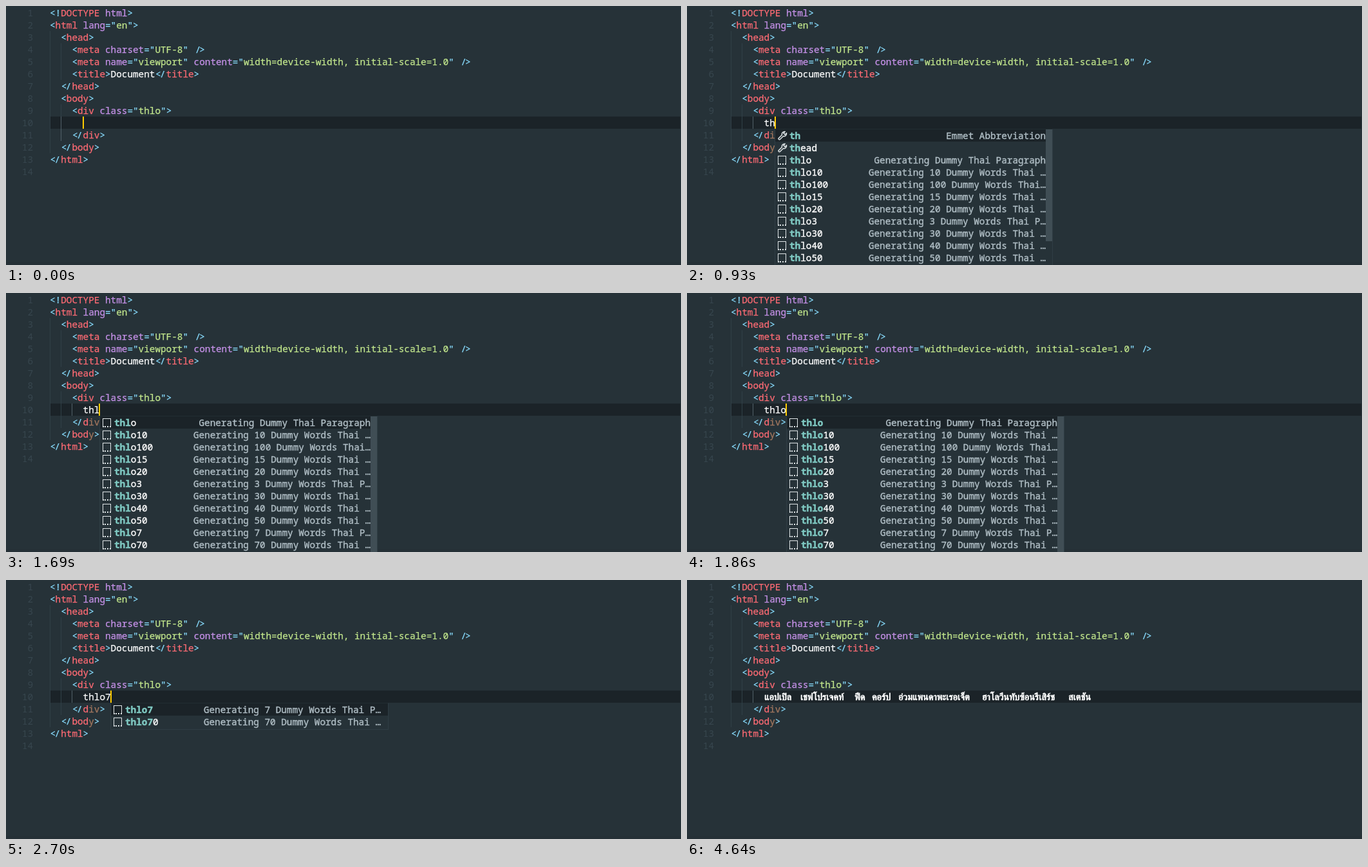
Write an HTML page that moves like this. It is 1048 px wide and 403 px high and loops after 5120 ms.

```html
<!DOCTYPE html>
<html lang="en">
<head>
<meta charset="utf-8">
<title>Snippet completion</title>
<style>
html, body { margin: 0; width: 100%; height: 100%; overflow: hidden; background: #263238; }
#stage { position: relative; width: 1048px; height: 403px; overflow: hidden; color: #fff;
  font: 14.333px/19px "Noto Sans Mono", "DejaVu Sans Mono", monospace; font-variant-ligatures: none;
  -webkit-text-stroke: .25px; }
#stage div, #stage svg { position: absolute; white-space: pre; }
b { font-weight: 400; }
i { font-style: normal; position: relative; }
u { text-decoration: none; }
.dim u { color: #a5785f; }
.p { color: #89ddff; } .t { color: #ff6b74; } .a { color: #c792ea; } .s { color: #c3e88d; }
.num { width: 42px; text-align: right; color: #37464e; -webkit-text-stroke: 0; }
.guide { width: 1px; background: #304047; }
.guide.on { background: #506068; }
#line { left: 68px; top: 172px; width: 979px; height: 19px; background: #1b2328; }
#foot { top: 398px; width: 1048px; height: 5px; background: #253036; }
#caret { top: 172px; width: 2px; height: 19px; background: #fc0; }
#thai { font-weight: 600; }
#popup { top: 191px; width: 430px; overflow: hidden;
  background: #263238; border: 1px solid #2f3d44; border-top-color: #222d32; }
.row { left: 0; width: 430px; height: 19px; font-weight: 500; -webkit-text-stroke: .4px; }
.row.on { background: #1b2328; }
.row b { font-weight: 700; color: #80cbc4; }
.label { left: 22px; }
.detail { color: #b0bec5; }
.icon { left: 4px; top: 3px; width: 11px; height: 11px; border: 1px solid #dfe5e7; border-bottom: 2px dotted #dfe5e7; }
.thumb { left: 420px; width: 11px; background: #404e55; }
</style>
</head>
<body>
<div id="stage"></div>
<script>
const CHAR = 8.6, ROW = 19, LOOP = 5120;
const stage = document.getElementById('stage');
const code = `<!DOCTYPE html>
<html lang="en">
  <head>
    <meta charset="UTF-8" />
    <meta name="viewport" content="width=device-width, initial-scale=1.0" />
    <title>Document</title>
  </head>
  <body>
    <div class="thlo">

    </div>
  </body>
</html>
`.split('\n');

const span = (cls, s) => `<b class=${cls}>${s}</b>`;
const nudge = (s, dx) => `<i style="left:${dx}px">${s}</i>`;

function paintTag(tag) {
  let named = false;
  return tag.replace(/<[!/]?|\/?>|=|"[^"]*"|[\w-]+/g, s => {
    if (s[0] == '"') return span('p', '"') + span('s', s.slice(1, -1)) + span('p', '"');
    if (/^\w/.test(s)) {
      const cls = named ? 'a' : 't';
      named = true;
      return span(cls, s);
    }
    // Tight bracket pairs, as in a coding font
    if (s == '</') return span('p', nudge('&lt;', .5) + nudge('/', -1));
    if (s == '/>') return span('p', nudge('/', 2) + '&gt;');
    return span('p', s.replace('<', '&lt;').replace('>', '&gt;'));
  });
}

function add(html, style = '', cls = '', id = '') {
  const el = document.createElement('div');
  el.innerHTML = html;
  el.style.cssText = style;
  el.className = cls;
  el.id = id;
  stage.append(el);
  return el;
}

const lineTop = n => 1 + ROW * (n - 1);
const guide = (x, from, to) =>
  add('', `left:${x}px;top:${lineTop(from)}px;height:${(to - from + 1) * ROW}px`, 'guide');

add('', '', '', 'foot');
add('', '', '', 'line');
guide(68, 3, 12);
guide(85, 4, 6);
guide(85, 9, 9);
const outer = guide(85, 10, 11), inner = guide(102, 10, 10);
inner.classList.add('on');
code.forEach((text, i) => {
  let html = text.replace(/<[^>]+>/g, paintTag);
  if (i == 10 || i == 11) html = html.replace(/(iv|y)(?=<\/b>)/, '<u>$1</u>');
  add(i + 1, `top:${lineTop(i + 1)}px`, 'num');
  add(html, `left:68px;top:${lineTop(i + 1)}px`);
});
const typed = add('', 'left:0;top:172px');
const popup = add('', '', '', 'popup');
const caret = add('', '', '', 'caret');

// Completion lists: [label, detail, has wrench icon]
const lorem = n => ['thlo' + n, n ? `Generating ${n} Dummy Words Thai Paragraph` : 'Generating Dummy Thai Paragraph'];
const svelte = s => ['s-' + s, 'svelte-' + s];
const all = ['', 10, 100, 15, 20, 3, 30, 40, 50, 7, 70].map(lorem);
const lists = {
  t: { rows: [...[30, 40, 50, 7, 70].map(lorem), ...['then-block', 'transition', 'transition-all',
      'transition-events', 'transition-local', 'transition-params', 'await-then-block'].map(svelte)],
    pick: 3, shift: -17, thumb: [141, 71] },
  th: { rows: [['th', 'Emmet Abbreviation', 1], ['thead', '', 1], ...all.slice(0, 9)], thumb: [0, 174] },
  thl: { rows: all, thumb: [0, 212] },
  thlo: { rows: all, thumb: [0, 212] },
  thlo7: { rows: all.slice(9) }
};
const wrench = `<svg style="left:4px;top:2px" width="15" height="15" fill="none" stroke="#dfe5e7" stroke-width="1.5">
<path d="M11 1.5A4 4 0 0 0 6.5 6.5L1.5 11.5A1.4 1.4 0 0 0 3.5 13.5L8.5 8.5A4 4 0 0 0 13.5 4L11 6L9 4Z"/></svg>`;
const clip = s => s.length > 32 ? s.slice(0, 31) + '…' : s;

function listHtml(query) {
  const { rows, pick = 0, shift = 0, thumb } = lists[query];
  const match = new RegExp(`(^|-)(${query})`);
  return (thumb ? `<div class="thumb" style="top:${thumb[0]}px;height:${thumb[1]}px"></div>` : '') +
    rows.map(([label, detail, tool], i) =>
      `<div class="row${i == pick ? ' on' : ''}" style="top:${shift + i * ROW}px;${thumb ? 'width:420px' : ''}">` +
      (tool ? wrench : '<div class="icon"></div>') +
      `<div class="label">${label.replace(match, '$1<b>$2</b>')}</div>` +
      `<div class="detail" style="right:${thumb ? 0 : 11}px">${clip(detail)}</div></div>`).join('');
}

const thai = [[120, 'แอปเปิล'], [176, 'เชฟโปรเจคท์'], [260, 'ฟีด'], [287, 'คอร์ป'],
  [328, 'อ่วมแพนดาพะเรอเจ็ต'], [458, 'ฮาโลวีนทับซ้อนรีเสิร์ช'], [592, 'สเตชัน']];
const thaiHtml = `<div id="thai">${thai.map(([x, w]) => `<div style="left:${x}px">${w}</div>`).join('')}</div>`;

const keys = [[0, ''], [600, 't'], [930, 'th'], [1690, 'thl'], [1860, 'thlo'], [2700, 'thlo7'], [3180, null]];
const hidden = [[300, 600], [1390, 1690], [2320, 2700], [3710, 4190], [4640, LOOP]];
let shown;

function render(t) {
  const text = keys.filter(k => k[0] <= t).pop()[1];
  const x = text === null ? 631 : 68 + CHAR * (6 + text.length);
  if (text !== shown) {
    shown = text;
    typed.innerHTML = text === null ? thaiHtml : `<div style="left:119.6px">${text}</div>`;
    popup.innerHTML = text ? listHtml(text) : '';
    popup.style.left = Math.floor(x) + 'px';
    popup.style.height = (text == 'thlo7' ? 40 : 212) + 'px';
    caret.style.left = Math.floor(x - .6) + 'px';
  }
  popup.hidden = !text || t < 700;
  caret.hidden = hidden.some(([from, to]) => t >= from && t < to);
  inner.hidden = t < 600;
  outer.classList.toggle('on', t < 600);
  stage.classList.toggle('dim', t >= 930);
}

const start = performance.now();
function tick() {
  render((performance.now() - start) % LOOP);
  requestAnimationFrame(tick);
}
tick();
</script>
</body>
</html>
```
